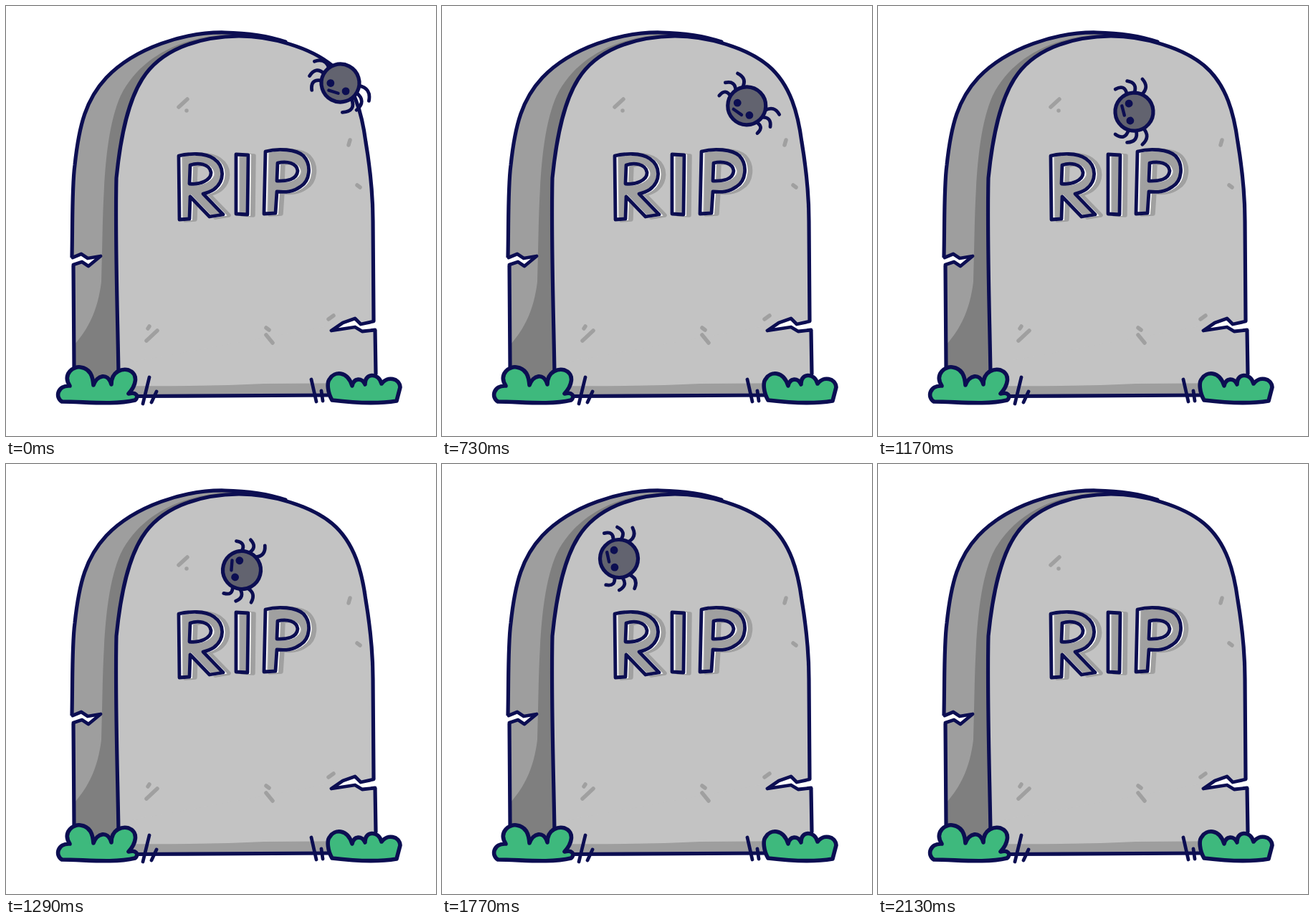
Recreate the animation shown at these times as an HTML page. Size 600 by 600 pixels, loop 2210 ms.

```html
<!DOCTYPE html>
<html lang="en">
<head>
<meta charset="utf-8">
<title>Spider on a tombstone</title>
<style>
  html, body { margin: 0; width: 100%; height: 100%; overflow: hidden; background: #fff; }
  svg { display: block; width: 100%; height: 100%; }
  .ink { stroke: #0c0e52; stroke-width: 5.2; stroke-linecap: round; stroke-linejoin: round; fill: none; }
  .shade { stroke: #a0a0a0; stroke-width: 5.5; stroke-linecap: round; stroke-linejoin: round; fill: none; }
</style>
</head>
<body>
<svg viewBox="0 0 600 600">
  <defs>
    <path id="letters" fill-rule="evenodd" d="
      M241 209C255 206 277 204 290 213C306 224 305 245 290 256Q284 260 275 262L303 291L284 294L257 266L256 297L242 298Z
      M257 222C268 218 284 220 286 232C287 243 270 250 256 248Z
      M321 207L338 208L337 291L321 290Z
      M362 203C380 198 405 200 415 209C427 222 424 244 411 252C400 260 390 260 378 259L376 289L360 290Z
      M379 219C392 216 406 219 407 230C406 242 392 245 378 244Z"/>
    <path id="face" d="M157 515C156 440 152 330 154 240C158 200 166 140 190 102C215 62 265 43 325 42C370 42 425 58 455 83C487 110 497 152 502 190Q512 250 512 300L513 440"/>
    <path id="back" d="M92 350C93 300 92 250 96 222C102 165 112 130 140 100C180 58 250 36 305 37Q355 38 390 50"/>
  </defs>

  <!-- side of the stone -->
  <path fill="#9e9e9e" d="M95 535L92 350C93 300 92 250 96 222C102 165 112 130 140 100C180 58 250 36 305 37Q355 38 390 50L157 535Z"/>
  <path fill="#7f7f7f" d="M330 38C243 40 187 72 160 125C140 170 137 240 135 300L133 385C128 425 115 450 96 472L95 535H160L200 120L330 48Z"/>

  <!-- front face -->
  <use href="#face" fill="#c3c3c3"/>
  <path fill="#c3c3c3" d="M156 500L513 435L516 543L157 545Z"/>
  <path fill="#9e9e9e" d="M160 530Q280 531 360 527L515 526V543L160 545Z"/>
  <g class="ink">
    <use href="#face"/>
    <use href="#back"/>
    <path d="M95 504L94 361M515 452L516 513M178 544.5L452 543"/>
  </g>

  <!-- cracks -->
  <g fill="#fff">
    <path d="M88 352L105 346L114 352L132 349L115 363L106 357L88 363ZM519 439L495 444L487 436L470 442L454 453L487 448L497 454L519 452Z"/>
    <path class="ink" style="stroke-width:4.8" d="M93 351L105 346L114 352L132 349L115 363L106 357L94 361M513 440L495 444L487 436L470 442L454 453L487 448L497 454L515 452"/>
  </g>

  <!-- chips -->
  <path class="shade" d="M241 141L253 130M252 146v.1M480 187L478 194M490 250L494 253M200 447L198 450M211 453L196 467M363 449L367 452M363 459L372 470M457 432L450 437"/>

  <!-- engraving -->
  <use href="#letters" class="shade" style="fill:#a0a0a0" x="8" y="1"/>
  <use href="#letters" fill="none" stroke="#fff" stroke-width="3" x="2.5" y=".5"/>
  <use href="#letters" class="ink" style="stroke-width:4.8"/>

  <!-- grass -->
  <g class="ink" style="stroke-width:5.6">
    <path fill="#3eb97d" d="M78 552C68 546 72 529 89 530C78 513 95 502 104 504C118 506 121 517 122 529C127 515 142 511 147 528C147 508 164 506 171 508C186 514 181 530 171 541C182 538 186 545 180 550C150 557 110 552 78 552Z"/>
    <path fill="#3eb97d" d="M455 550C449 540 447 525 452 520C458 510 476 508 483 530C485 519 497 518 501 528C500 512 520 511 524 527C532 516 549 519 550 532L545 551C515 556 480 553 455 550Z"/>
    <path style="stroke-width:4.8" d="M200 518L191 555M210 538L203 553M426 521L433 552M440 537L442 551"/>
  </g>

  <g id="spider" class="ink">
    <path id="legs" stroke-width="4.8"/>
    <circle r="26.5" fill="#62636f"/>
    <g fill="#0c0e52" stroke="none"><circle cx="-12" cy="6.5" r="5.4"/><circle cx="12" cy="6.5" r="5.4"/></g>
    <path style="stroke-width:4.4" d="M-9.5 16.5L4 14"/>
  </g>
</svg>
<script>
const LOOP = 2210, LEAVE = 2130, STRIDE = 1010, RADIUS = 26;
const spider = document.getElementById('spider');
const legs = document.getElementById('legs');

// Stops along the crawl; the spider rests between the second and third
const stops = [
  { t: 0, x: 466.5, y: 107.5, turn: 28 },
  { t: 480, x: 438, y: 136, turn: 40 },
  { t: 610, x: 438, y: 136, turn: 40 },
  { t: 1010, x: 395.5, y: 147, turn: 60 },
  { t: 1290, x: 329, y: 148, turn: 105 },
  { t: 1570, x: 281, y: 136, turn: 92 },
  { t: 1770, x: 247, y: 132, turn: 88 },
  { t: 2090, x: 164, y: 95, turn: 96 }
];

// The drawing is held on steps of 80 ms at first, then 40 ms
function hold(t) {
  if (t < 650) return Math.min(480, Math.floor(t / 80) * 80);
  return 650 + Math.floor((t - 650) / 40) * 40;
}

function pose(t) {
  const next = Math.max(1, stops.findIndex(stop => stop.t >= t));
  const a = stops[next - 1], b = stops[next];
  const k = (t - a.t) / (b.t - a.t);
  const mix = key => a[key] + (b[key] - a[key]) * k;
  return { x: mix('x'), y: mix('y'), turn: mix('turn') };
}

function polar(degrees, radius) {
  const angle = degrees * Math.PI / 180;
  return [radius * Math.cos(angle), radius * Math.sin(angle)];
}

// A hooked leg on one side (1 or -1); row 0 is nearest the face
function legPath(side, row, swing) {
  const [hx, hy] = polar(16 - 23 * row + swing / 3, RADIUS);
  const [tx, ty] = polar(28 - 27 * row + swing, 41 + 3 * row);
  const bend = 0.7 - 0.1 * row;
  const cx = (hx + tx) / 2 + (ty - hy) * bend;
  const cy = (hy + ty) / 2 - (tx - hx) * bend;
  return `M${side * hx} ${hy}Q${side * cx} ${cy} ${side * tx} ${ty}`;
}

function legsPath(t) {
  const stride = Math.cos(2 * Math.PI * t / STRIDE);
  let d = '';
  for (let row = 0; row < 3; row++) {
    d += legPath(-1, row, 14 * stride) + legPath(1, row, 30 * stride);
  }
  return d;
}

function draw(time) {
  const visible = time < LEAVE;
  spider.style.display = visible ? '' : 'none';
  if (!visible) return;
  const t = hold(time);
  const { x, y, turn } = pose(t);
  spider.setAttribute('transform', `translate(${x} ${y}) rotate(${turn})`);
  legs.setAttribute('d', legsPath(t));
}

const start = performance.now();
function tick() {
  draw((performance.now() - start) % LOOP);
  requestAnimationFrame(tick);
}
tick();
</script>
</body>
</html>
```
